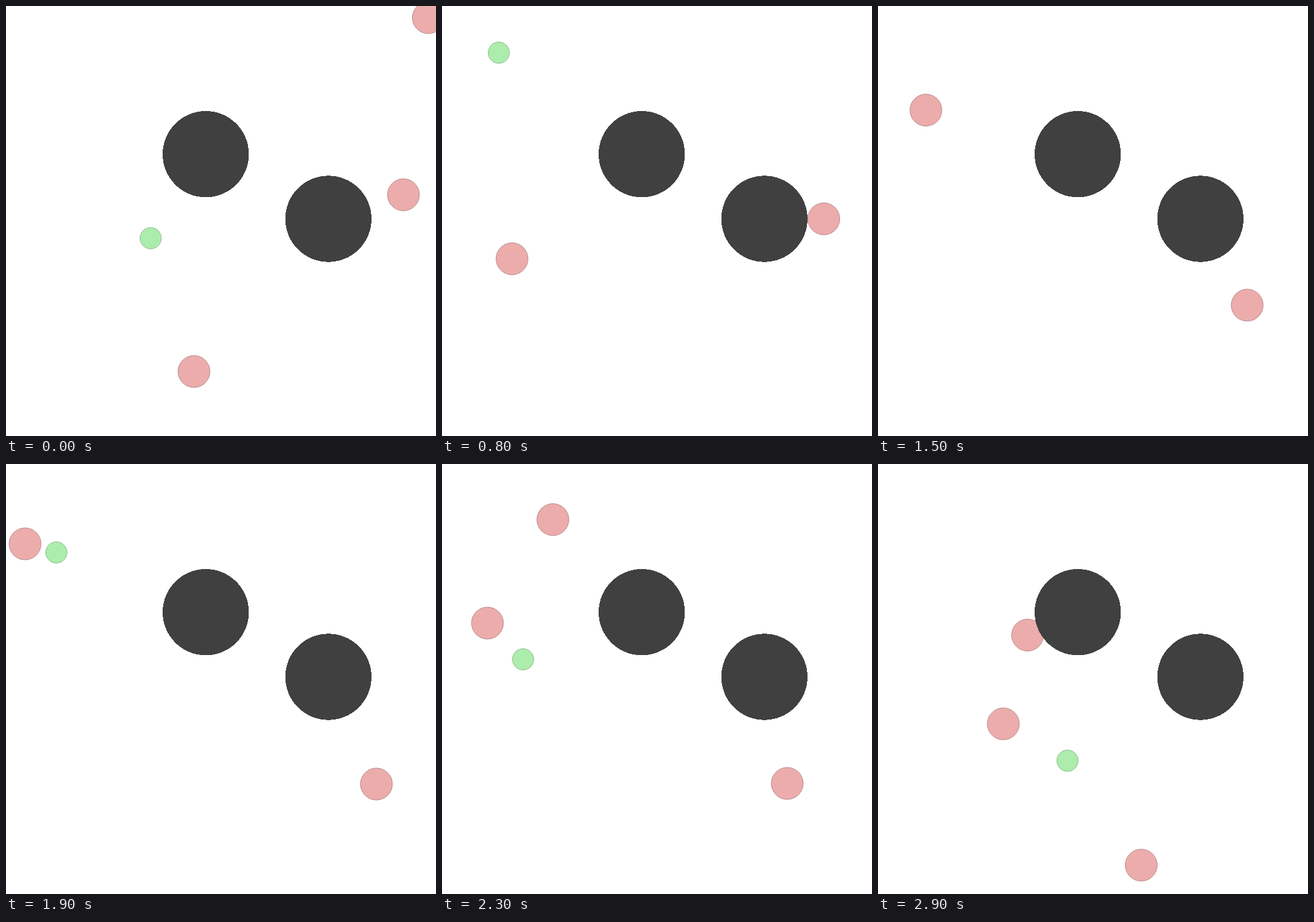
An HTML page that plays this animation: 700 by 700 pixels, repeating every 3 s.

```html
<!DOCTYPE html>
<html lang="en">
<head>
<meta charset="utf-8">
<title>Chase</title>
<style>
  html, body { margin: 0; width: 100%; height: 100%; overflow: hidden; background: #fff; }
  svg { display: block; width: 700px; height: 700px; }
  .hunter { fill: #ecacac; stroke: #b98888; }
  .prey { fill: #acecac; stroke: #88b988; }
  .rock { fill: #404040; shape-rendering: crispEdges; }
</style>
</head>
<body>
<svg viewBox="0 0 700 700">
  <circle class="hunter" id="left" r="26"/>
  <circle class="hunter" id="top" r="26"/>
  <circle class="hunter" id="right" r="26"/>
  <circle class="prey" id="prey" r="17.3"/>
  <circle class="rock" cx="325.2" cy="241.2" r="70.2"/>
  <circle class="rock" cx="524.8" cy="346.5" r="70.2"/>
</svg>
<script>
const STEP = 100, STEPS = 30;

// All paths pass their key points at the same steps
const keys = [0, 4, 8, 12, 15, 19, 23, 29];
const paths = {
  prey: "235.5,378 143.5,251 92.5,76 66,-100 70,-36 82,144 132,318 308.5,483",
  left: "306,595 191.5,525 114,411.5 86,272 78,169.5 31,130 74,259 204,423",
  top: "687.5,19 615,15 530,-32 405,-75 300,-90 196,-34 180.5,90.5 243.5,278.5",
  right: "647,307.3 598.5,319 621.5,346.5 608.5,431 601,487 603,521 562,520 428.5,653"
};

// Slope of the parabola through a key value and its neighbours
function slope(values, i) {
  const rate = k => (values[k + 1] - values[k]) / (keys[k + 1] - keys[k]);
  if (i === 0) return rate(0);
  if (i === keys.length - 1) return rate(i - 1);
  const before = keys[i] - keys[i - 1], after = keys[i + 1] - keys[i];
  return (rate(i - 1) * after + rate(i) * before) / (before + after);
}

// Cubic Hermite curve through the key values
function at(values, step) {
  const i = Math.max(0, keys.findIndex(key => key >= step) - 1);
  const span = keys[i + 1] - keys[i];
  const u = (step - keys[i]) / span, v = 1 - u;
  return values[i] * v * v * (1 + 2 * u) + values[i + 1] * u * u * (1 + 2 * v)
    + span * u * v * (v * slope(values, i) - u * slope(values, i + 1));
}

const movers = Object.entries(paths).map(([id, path]) => {
  const points = path.split(" ").map(point => point.split(",").map(Number));
  return { dot: document.getElementById(id), xs: points.map(p => p[0]), ys: points.map(p => p[1]) };
});

function draw() {
  const step = Math.floor(performance.now() / STEP) % STEPS;
  for (const { dot, xs, ys } of movers) {
    dot.setAttribute("cx", at(xs, step));
    dot.setAttribute("cy", at(ys, step));
  }
  requestAnimationFrame(draw);
}
draw();
</script>
</body>
</html>
```
